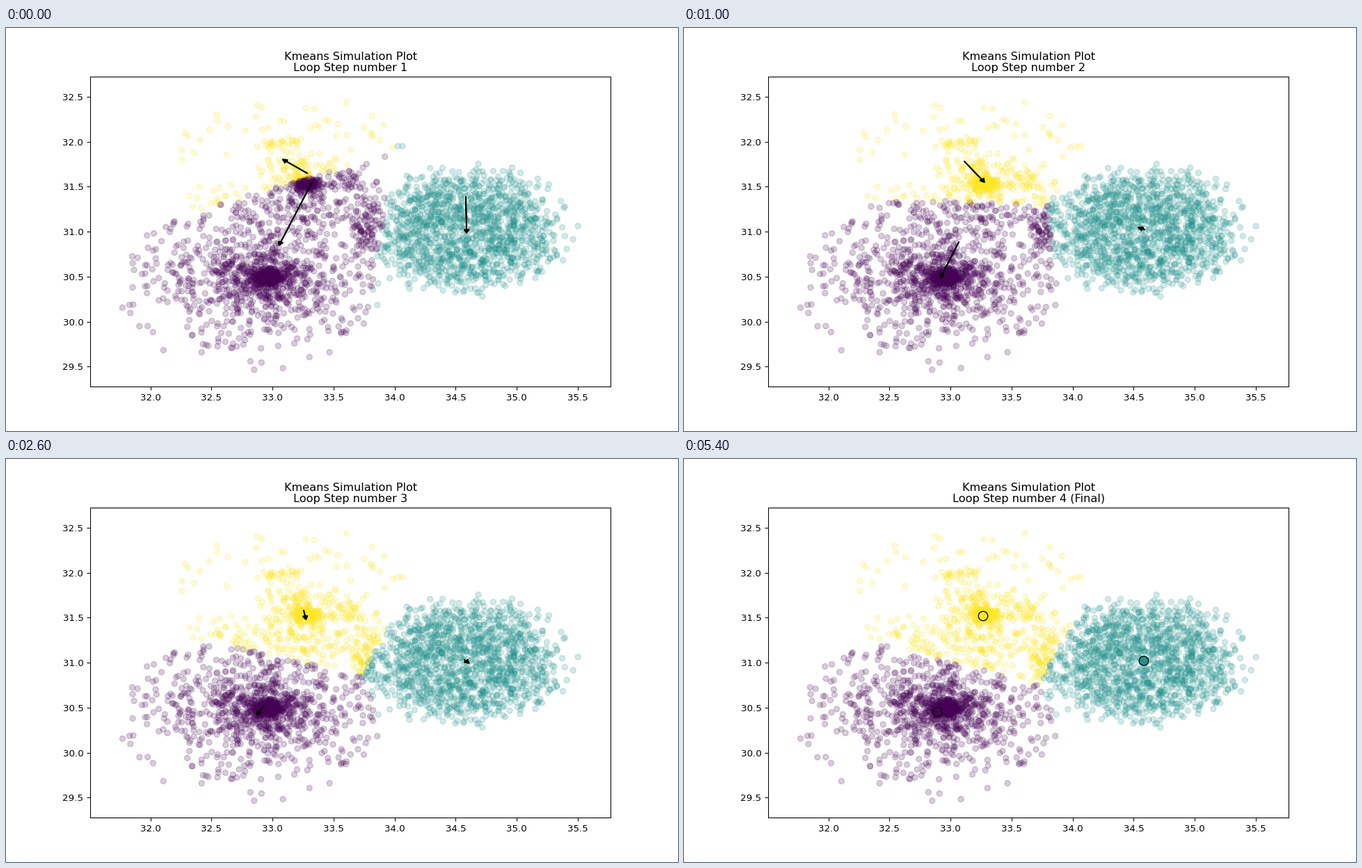
These frames come from a looping animation (966x580 px, 7000 ms). A matplotlib script:

```python
import numpy as np
import matplotlib.pyplot as plt
from matplotlib.animation import FuncAnimation

WIDTH, HEIGHT, DPI = 966, 580, 96.6
XLIM, YLIM = (31.505, 35.770), (29.276, 32.727)
LAST_STEP = 3

# Centroids (purple, teal, yellow) at each step, in stage pixels
CENTROIDS = [
    [(440, 222), (661, 243), (433, 209)],
    [(395, 308), (662, 290), (403, 192)],
    [(371, 355), (659, 289), (428, 218)],
    [(364, 364), (661, 290.5), (430, 226)],
]

rng = np.random.default_rng(7)
fig, ax = plt.subplots(figsize=(WIDTH / DPI, HEIGHT / DPI), dpi=DPI)


def to_data(pixels):
    x, y = np.asarray(pixels, float).T
    box = ax.get_position()
    u = (x / WIDTH - box.x0) / box.width
    v = (1 - y / HEIGHT - box.y0) / box.height
    return np.column_stack([XLIM[0] + u * (XLIM[1] - XLIM[0]),
                            YLIM[0] + v * (YLIM[1] - YLIM[0])])


def blob(count, center, sigma, reach=2.2):
    """Gaussian cloud cut off at `reach` standard deviations."""
    z = rng.normal(size=(count * 2, 2))
    z = z[np.hypot(*z.T) < reach][:count]
    return center + z * sigma


def disc(count, center, radii, inner=0, arc=2 * np.pi):
    """Evenly filled ellipse, optionally only its rim or an upper arc."""
    angle = rng.uniform(0, arc, count)
    r = np.sqrt(rng.uniform(inner ** 2, 1, count))
    return center + np.column_stack([np.cos(angle), -np.sin(angle)]) * r[:, None] * radii


def nearest(centers):
    offsets = points[:, None] - centers[None]
    return (offsets ** 2).sum(axis=2).argmin(axis=1)


teal = disc(1400, (661, 291), (120, 75)) + blob(1400, (0, 0), (25, 15))
purple = [
    disc(50, (350, 372), (190, 122), inner=0.85),
    blob(680, (362, 358), (84, 51)),
    blob(270, (373, 360), (37, 25)),
    blob(230, (375, 360), (11, 7)),
    blob(75, (515, 285), (14, 28)),
]
yellow = [
    disc(42, (410, 190), (170, 95), inner=0.5, arc=np.pi),
    blob(120, (440, 252), (54, 24)),
    blob(45, (490, 216), (25, 14)),
    blob(125, (422, 212), (29, 18)),
    blob(170, (431, 224), (10, 6)),
    blob(28, (393, 166), (17, 6)),
    blob(22, (310, 246), (28, 10)),
]
points = to_data(np.vstack([teal, *purple, *yellow]))
centroids = [to_data(c) for c in CENTROIDS]
labels = [nearest(c) for c in centroids]


def draw(second):
    step = min(second, LAST_STEP)
    centers = centroids[step]
    ax.clear()
    ax.scatter(*points.T, c=labels[step], cmap="viridis", alpha=0.2)
    if step == LAST_STEP:
        ax.scatter(*centers.T, c=range(3), cmap="viridis", s=100,
                   edgecolors="black", zorder=3)
    else:
        for start, end in zip(centers, centroids[step + 1]):
            ax.arrow(*start, *(end - start), head_width=0.04, head_length=0.04,
                     color="black", linewidth=1.3, zorder=3)
    ax.set(xlim=XLIM, ylim=YLIM)
    suffix = " (Final)" if step == LAST_STEP else ""
    ax.set_title(f"Kmeans Simulation Plot\nLoop Step number {step + 1}{suffix}",
                 linespacing=1.03)
    return []


anim = FuncAnimation(fig, draw, frames=7, interval=1000, init_func=lambda: [],
                     repeat=True, repeat_delay=0)
plt.show()
```
